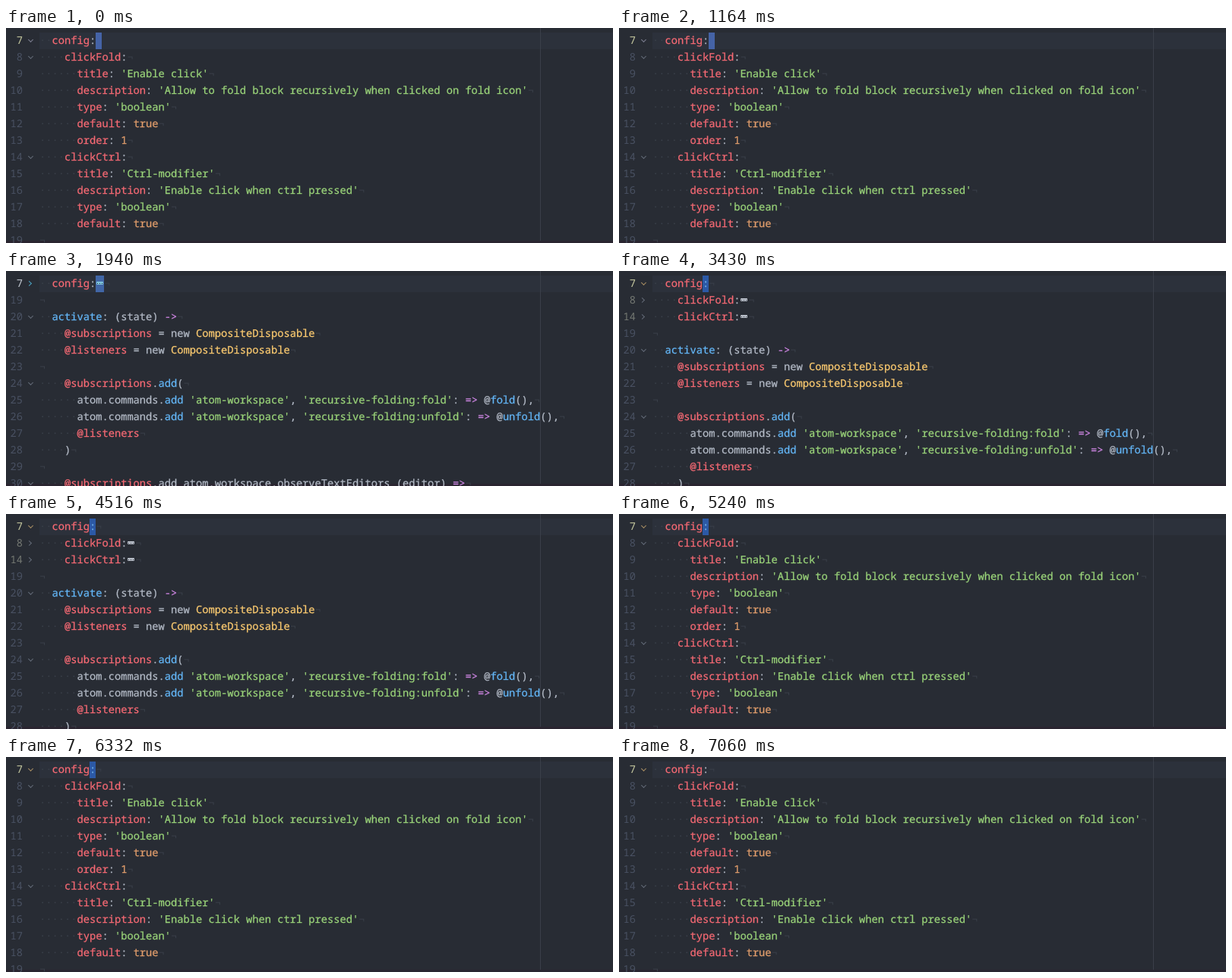
Write an HTML page that moves like this. It is 799x284 px and loops after 7.21 s.

```html
<!DOCTYPE html>
<html lang="en">
<head>
<meta charset="utf-8">
<title>Recursive folding</title>
<style>
html, body { margin: 0; width: 100%; height: 100%; overflow: hidden; background: #282c34; }
#stage {
  position: relative; width: 799px; height: 284px; overflow: hidden;
  font: 13.745px/22px "Noto Sans Mono", "DejaVu Sans Mono", monospace;
  text-rendering: geometricPrecision; font-variant-ligatures: none;
  color: #b4bbc7; white-space: pre;
}
#stage > *, .row, .row > * { position: absolute; }
#active { top: 6px; left: 44px; width: 755px; height: 22px; background: #2c313b; }
#edge { top: 281px; width: 799px; height: 3px; background: #2a2530; }
#guide { top: 0; left: 703px; width: 1px; height: 281px; background: #3a3f49; }
#box { top: 6px; height: 22px; }
#rows { top: 6px; left: 0; }
.row { left: 0; width: 799px; height: 22px; }
.num { right: 777px; color: #495162; }
.code { left: 44px; -webkit-text-stroke: .25px; }
.arrow {
  left: 29.5px; top: 6.5px; width: 4px; height: 4px;
  border: solid #636b78; border-width: 0 1.5px 1.5px 0; transform: rotate(45deg);
}
.arrow.shut { left: 27.5px; top: 8.25px; transform: rotate(-45deg); }
.faint { color: #3b414b; -webkit-text-stroke: 0; }
.red { color: #f76a74; }
.green { color: #9bd57a; }
.blue { color: #64b7f8; }
.orange { color: #e29e6c; }
.yellow { color: #fccb70; }
.purple { color: #cb84e0; }
.mark {
  display: inline-block; width: 9px; height: 4px; margin: 0 1px; border-radius: 1px; vertical-align: 3px;
  background: repeating-linear-gradient(90deg, #282c34 0 1px, transparent 1px 3px) 1px 2px / 7px 1px no-repeat, #b9bfc9;
}
</style>
</head>
<body>
<div id="stage">
  <div id="active"></div>
  <div id="edge"></div>
  <div id="guide"></div>
  <div id="box"></div>
  <div id="rows"></div>
</div>
<script>
const FIRST = 7;
const source = `  config:
    clickFold:
      title: 'Enable click'
      description: 'Allow to fold block recursively when clicked on fold icon'
      type: 'boolean'
      default: true
      order: 1
    clickCtrl:
      title: 'Ctrl-modifier'
      description: 'Enable click when ctrl pressed'
      type: 'boolean'
      default: true

  activate: (state) ->
    @subscriptions = new CompositeDisposable
    @listeners = new CompositeDisposable

    @subscriptions.add(
      atom.commands.add 'atom-workspace', 'recursive-folding:fold': => @fold(),
      atom.commands.add 'atom-workspace', 'recursive-folding:unfold': => @unfold(),
      @listeners
    )

    @subscriptions.add atom.workspace.observeTextEditors (editor) =>`.split('\n');

const foldable = [7, 8, 14, 20, 24, 30];
const foldEnd = { 7: 18, 8: 13, 14: 18 };
const rules = [
  ['green', /'[^']*'/],
  ['purple', /[=-]>/],
  ['blue', /\b(?:un)?fold(?=\()|activate|\badd(?=\(| ')/],
  ['red', /@\w+s\b|\w+(?=:)/],
  ['orange', /\btrue\b|\b1\b/],
  ['yellow', /CompositeDisposable/],
];
const lexer = new RegExp(rules.map(([, r]) => `(${r.source})`).join('|'), 'g');
const span = (cls, text = '', style = '') => `<span class="${cls}" style="${style}">${text}</span>`;

function highlight(line) {
  const body = line.trimStart();
  const dots = '·'.repeat(line.length - body.length);
  return span('faint', dots) + body.replace(lexer, (text, ...groups) =>
    span(rules[groups.findIndex(g => g !== undefined)][0], text.replace('>', '&gt;')));
}

const olive = '#a98f63', teal = '#4ba3c3';
// box: [left, width, colour]; head: colours of the first line's number and arrow
const states = [
  { until: 1940, folds: [], box: [118, 8, '#4563a6'], head: ['#c6c9a0', '#7d7f91'] },
  { until: 3430, folds: [7], box: [118, 11, '#4166a6'], head: ['#c3cad2', teal], mark: '#7ec3dc' },
  { until: 5240, folds: [8, 14], box: [110, 8, '#2c59a6'], head: ['#c6c9a0', olive], colon: '#75b5ea' },
  { until: 7060, folds: [], box: [110, 8, '#2c59a6'], head: ['#c6c9a0', olive], colon: '#75b5ea' },
  { until: 7210, folds: [], box: [110, 0, 'none'], head: ['#c6c9a0', olive] },
];

function show(state) {
  const { folds, box: [left, width, colour], head, mark, colon } = state;
  const rows = [];
  for (let n = FIRST; rows.length < 13; n++) {
    const top = n === FIRST, shut = folds.includes(n);
    let code = highlight(source[n - FIRST]);
    if (top && colon) code = code.replace(/:$/, span('', ':', `color:${colon}`));
    if (shut) code += span('mark', '', top ? `background-color:${mark}` : '');
    const covered = top && left === 118 && !shut;
    if (!covered) code += span('faint', '¬');
    const numColour = top ? `color:${head[0]}` : shut ? 'color:#747872' : '';
    const arrow = foldable.includes(n)
      ? span(shut ? 'arrow shut' : 'arrow', '', top ? `border-color:${head[1]}` : '') : '';
    rows.push(`<div class="row" style="top:${rows.length * 22}px">` +
      span('num', n, numColour) + arrow + span('code', code) + '</div>');
    if (shut) n = foldEnd[n];
  }
  document.getElementById('rows').innerHTML = rows.join('');
  Object.assign(document.getElementById('box').style,
    { left: left + 'px', width: width + 'px', background: colour });
}

const start = performance.now();
let current;
function tick() {
  const t = (performance.now() - start) % 7210;
  const next = states.find(s => t < s.until);
  if (next !== current) show(current = next);
  requestAnimationFrame(tick);
}
tick();
</script>
</body>
</html>
```
